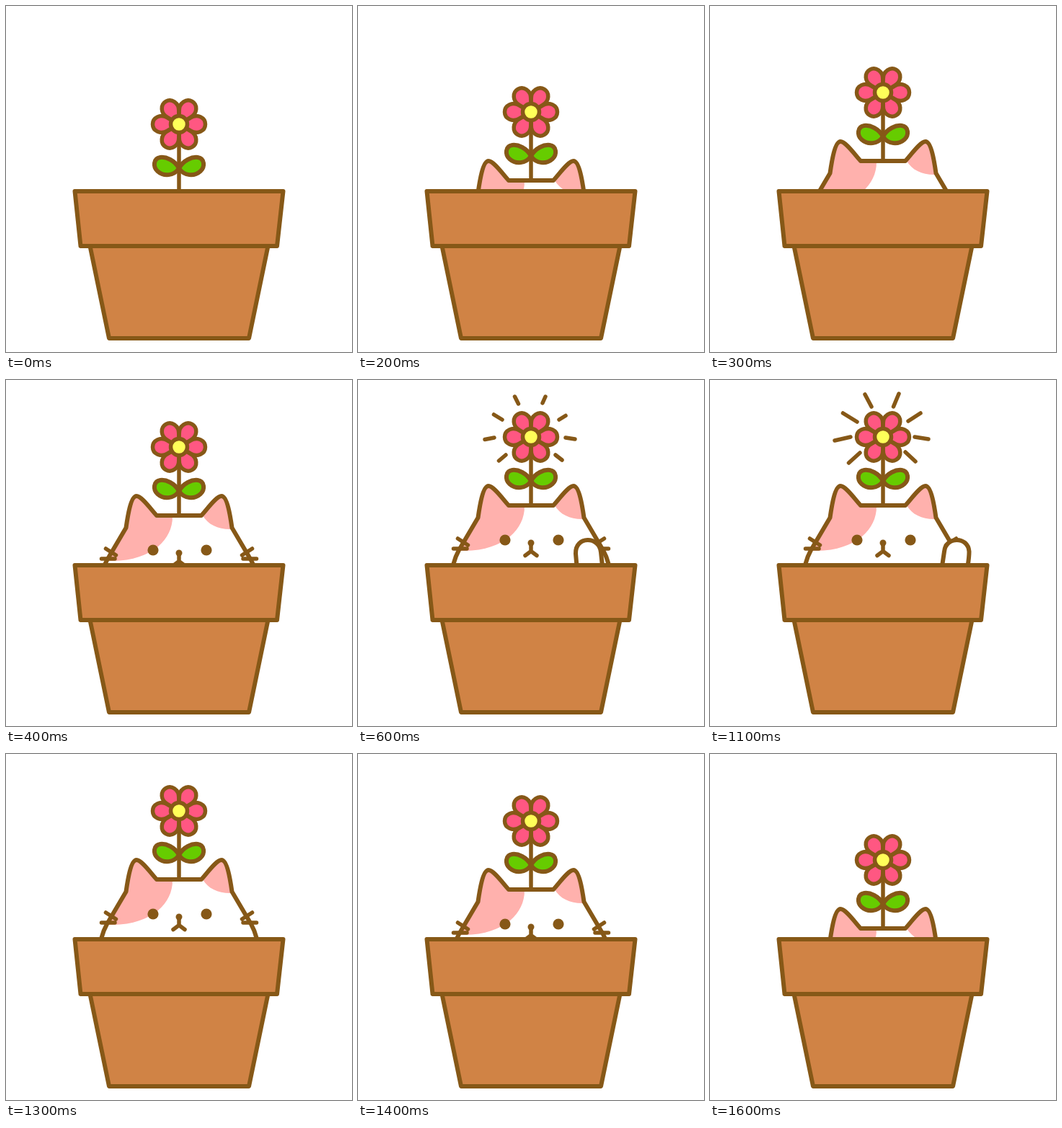
An HTML page for the animation above (1.7 s loop, 480 by 480 pixels).

```html
<!DOCTYPE html>
<html lang="en">
<head>
<meta charset="utf-8">
<title>Flowerpot cat</title>
<style>
  html, body { margin: 0; width: 100%; height: 100%; overflow: hidden; background: #fff; }
  svg { display: block; width: 100vw; height: 100vh; }
  .line { fill: none; stroke: #865817; stroke-width: 6; stroke-linecap: round; stroke-linejoin: round; }
  .thin { stroke-width: 5.5; }
  .white { fill: #fff; }
  .brown { fill: #865817; }
  .pink { fill: #ffb1ad; }
  .petal { fill: #ff5782; }
  .leaf { fill: #66cc00; }
  .clay { fill: #d08345; }
  .heart { fill: #ffff59; }

  .rise, .head, .in, .out { animation: 1700ms step-end infinite; }
  .rise { animation-name: rise; }
  .head { animation-name: head; }
  .in { animation-name: in; }
  .out { animation-name: out; }

  @keyframes rise {
    0%, 100% { transform: translateY(85px); }
    11.76%, 94.11% { transform: translateY(68px); }
    17.64%, 88.23% { transform: translateY(41px); }
    23.52%, 82.35% { transform: translateY(14px); }
    29.41%, 76.47% { transform: translateY(0); }
  }
  @keyframes head {
    0%, 100% { opacity: 0; }
    11.76% { opacity: 1; }
  }
  /* paw and rays swap between two poses every 100 ms */
  @keyframes in {
    0%, 41.17%, 52.94%, 64.7%, 76.47%, 100% { opacity: 0; }
    35.29%, 47.05%, 58.82%, 70.58% { opacity: 1; }
  }
  @keyframes out {
    0%, 47.05%, 58.82%, 70.58%, 100% { opacity: 0; }
    41.17%, 52.94%, 64.7% { opacity: 1; }
  }
</style>
</head>
<body>
<svg viewBox="0 0 480 480">
  <defs>
    <path id="face" d="M130 262L132.500 255Q135 245 140 236L166.500 191C168.500 177 173 147 181 147C188 147 200 164 209 174H271C280 164 292 147 299 147C307 147 311.500 177 313.500 191L340 236Q345 245 347.500 255L350 262Z"/>
    <clipPath id="faceClip"><use href="#face"/></clipPath>
    <path id="petal" class="line thin petal" d="M0 0L16 -9C26 -15 36.500 -9 36.500 0C36.500 9 26 15 16 9Z"/>
    <path id="leaf" class="line leaf" d="M240 140C234 129 222 124 214 125C204 126.500 204 138 210 144C219 152 233 151 240 140Z"/>
    <path id="whiskers" class="line thin" d="M138.500 220L152.500 229M132.500 234H151"/>
  </defs>

  <g class="rise">
    <path class="line thin" d="M240 79V178"/>
    <use href="#leaf"/>
    <use href="#leaf" transform="matrix(-1 0 0 1 480 0)"/>
    <g transform="translate(240 79)">
      <use href="#petal"/>
      <use href="#petal" transform="rotate(60)"/>
      <use href="#petal" transform="rotate(120)"/>
      <use href="#petal" transform="rotate(180)"/>
      <use href="#petal" transform="rotate(240)"/>
      <use href="#petal" transform="rotate(300)"/>
      <circle class="line thin heart" r="11.500"/>
    </g>
    <g class="head">
      <use href="#face" class="white"/>
      <g clip-path="url(#faceClip)" class="pink">
        <path d="M231 174C232 205 205 236 148 237H110V130H231Z"/>
        <path d="M273 174C280 187 296 194 314 193H330V130H273Z"/>
      </g>
      <use href="#face" class="line"/>
      <use href="#whiskers"/>
      <use href="#whiskers" transform="matrix(-1 0 0 1 480 0)"/>
      <g class="brown">
        <circle cx="204" cy="222" r="7.600"/>
        <circle cx="278" cy="222" r="7.600"/>
        <circle cx="240" cy="226" r="4.500"/>
      </g>
      <path class="line thin" d="M240 226V237.500L232 243.500M240 237.500L248 243.500"/>
    </g>
  </g>

  <g class="in">
    <path class="line white" d="M303.500 258L302 241C301 216 335 216 337 239L339 258"/>
    <path class="line thin" d="M217.500 23L222.500 33M260 23L256 32M188.500 48L200 55M288 49.500L279 55M176 82.500L189 80M288 80L301 82M195.500 112L205 104M274 104L283 111"/>
  </g>
  <g class="out">
    <path class="line white" d="M322 258L325 238C327 216.500 358 216.500 359.500 238Q359.500 246 357.500 258"/>
    <path class="line thin" d="M215 20L224 37M262 19L254.500 37M184.500 46L204 58M292 46L275 57M173 84L195 79M284 79L303 82M192.500 115L208 101M271 100L285 113"/>
  </g>

  <path class="line clay" d="M116.500 333L143 461H337L363.500 333Z"/>
  <path class="line clay" d="M95.500 257H384.500L376 333H103.500Z"/>
</svg>
</body>
</html>
```
